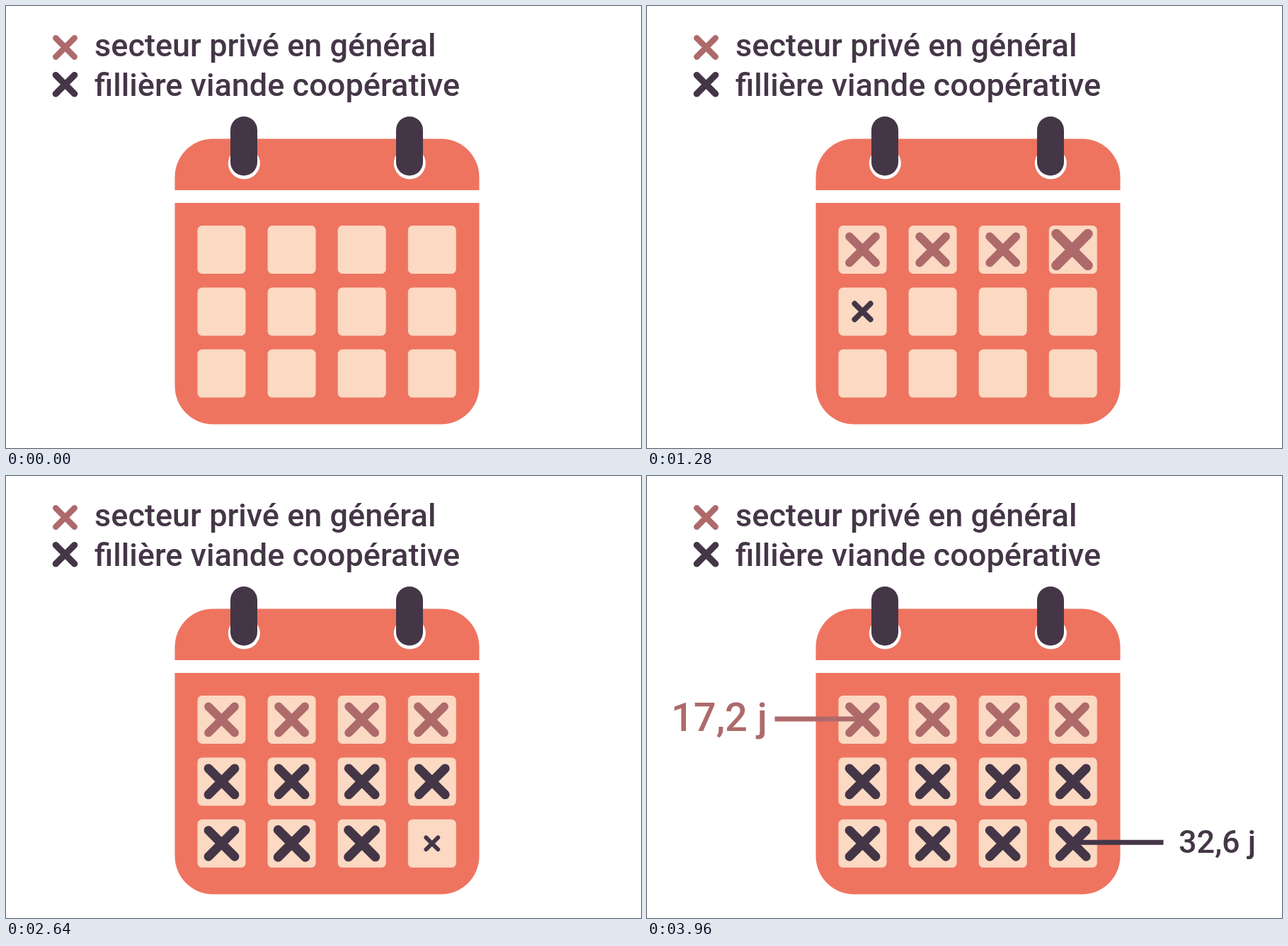
Animation of 897x624 px, one loop 4000 ms. Source, as an HTML page:

```html
<!DOCTYPE html>
<html lang="fr">
<head>
<meta charset="utf-8">
<style>
  html, body { margin: 0; width: 100%; height: 100%; overflow: hidden; background: #fff; }
  svg { display: block; }
  text { font: 500 45px Roboto, sans-serif; fill: #443647; }
</style>
</head>
<body>
<svg id="stage" width="897" height="624" viewBox="0 0 897 624">
  <text x="125" y="71">secteur privé en général</text>
  <text x="125" y="127">fillière viande coopérative</text>
  <rect x="238.5" y="187.5" width="430" height="403" rx="54" fill="#ee7460"/>
  <rect x="238" y="260" width="431" height="18" fill="#fff"/>
  <g id="pins"></g>
  <g id="cells"></g>
  <g id="crosses" stroke-linecap="round"></g>
  <path id="leftLine" stroke="#ae6a6b" stroke-width="7"/>
  <path id="rightLine" stroke="#443647" stroke-width="7"/>
  <text id="leftLabel" x="34" y="360" style="font-size:56px">17,2 j</text>
  <text id="rightLabel" x="751" y="532">32,6 j</text>
</svg>
<script>
const LOOP = 4000, STEP = 40;
const DARK = [68, 54, 71], PINK = [174, 106, 107];
const $ = id => document.getElementById(id);
const rgb = c => `rgb(${c.map(Math.round)})`;
const progress = (t, from, to) => Math.min(1, Math.max(0, (t - from) / (to - from)));

function add(parent, tag, attrs) {
  const el = document.createElementNS($('stage').namespaceURI, tag);
  for (const name in attrs) el.setAttribute(name, attrs[name]);
  return parent.appendChild(el);
}

// Age in ms and scale of a cross while it pops in
const POP = [[0, 0], [115, .465], [205, .8], [315, 1.03], [350, 1.13], [405, 1.2], [515, 1.035], [555, 1]];
function popScale(age) {
  if (age <= 0) return 0;
  const i = POP.findIndex(p => p[0] > age);
  if (i < 0) return 1;
  const [a, from] = POP[i - 1], [b, to] = POP[i];
  return from + (to - from) * (age - a) / (b - a);
}

function place(el, x, y, scale) {
  el.setAttribute('transform', `translate(${x} ${y}) scale(${scale})`);
  el.setAttribute('visibility', scale ? 'visible' : 'hidden');
}

function addCross(dark) {
  return add($('crosses'), 'path', {
    d: 'M-18.5-18.5 18.5 18.5M18.5-18.5-18.5 18.5',
    stroke: rgb(dark ? DARK : PINK),
    'stroke-width': dark ? 12.8 : 11.8
  });
}

for (const x of [336, 570]) {
  add($('pins'), 'circle', { cx: x + .3, cy: 222, r: 22.5, fill: '#fff' });
  add($('pins'), 'rect', { x: x - 19, y: 156, width: 38, height: 83.5, rx: 19, fill: rgb(DARK) });
}

place(addCross(false), 83.5, 58.5, .715);
place(addCross(true), 83.5, 110.8, .715);

const crosses = [];
for (let row = 0; row < 3; row++) {
  for (let col = 0; col < 4; col++) {
    const x = 304.5 + col * 99.1, y = 344 + row * 87.4;
    add($('cells'), 'rect', { x: x - 34, y: y - 34, width: 68, height: 68, rx: 6.5, fill: '#fbd9c3' });
    crosses.push({
      el: addCross(row > 0),
      x: row === 0 && col === 3 ? x - 1.3 : x,
      y,
      start: (row ? 327 : 275) + 200 * (row * 4 + col)
    });
  }
}

function draw(t) {
  for (const c of crosses) place(c.el, c.x, c.y, popScale(t - c.start));

  const grow = progress(t, 2680, 3040);
  $('leftLine').setAttribute('d', `M305 343H${305 - 124.5 * grow}`);
  $('rightLine').setAttribute('d', `M602 517.3H${602 + 127.5 * grow}`);

  const fade = progress(t, 2980, 3600);
  $('leftLabel').style.fill = rgb(DARK.map((v, i) => v + (PINK[i] - v) * fade));
  $('leftLabel').style.opacity = fade;
  $('rightLabel').style.opacity = progress(t, 2900, 3460);
}

function tick() {
  draw(Math.floor(performance.now() % LOOP / STEP) * STEP);
  requestAnimationFrame(tick);
}
tick();
</script>
</body>
</html>
```
